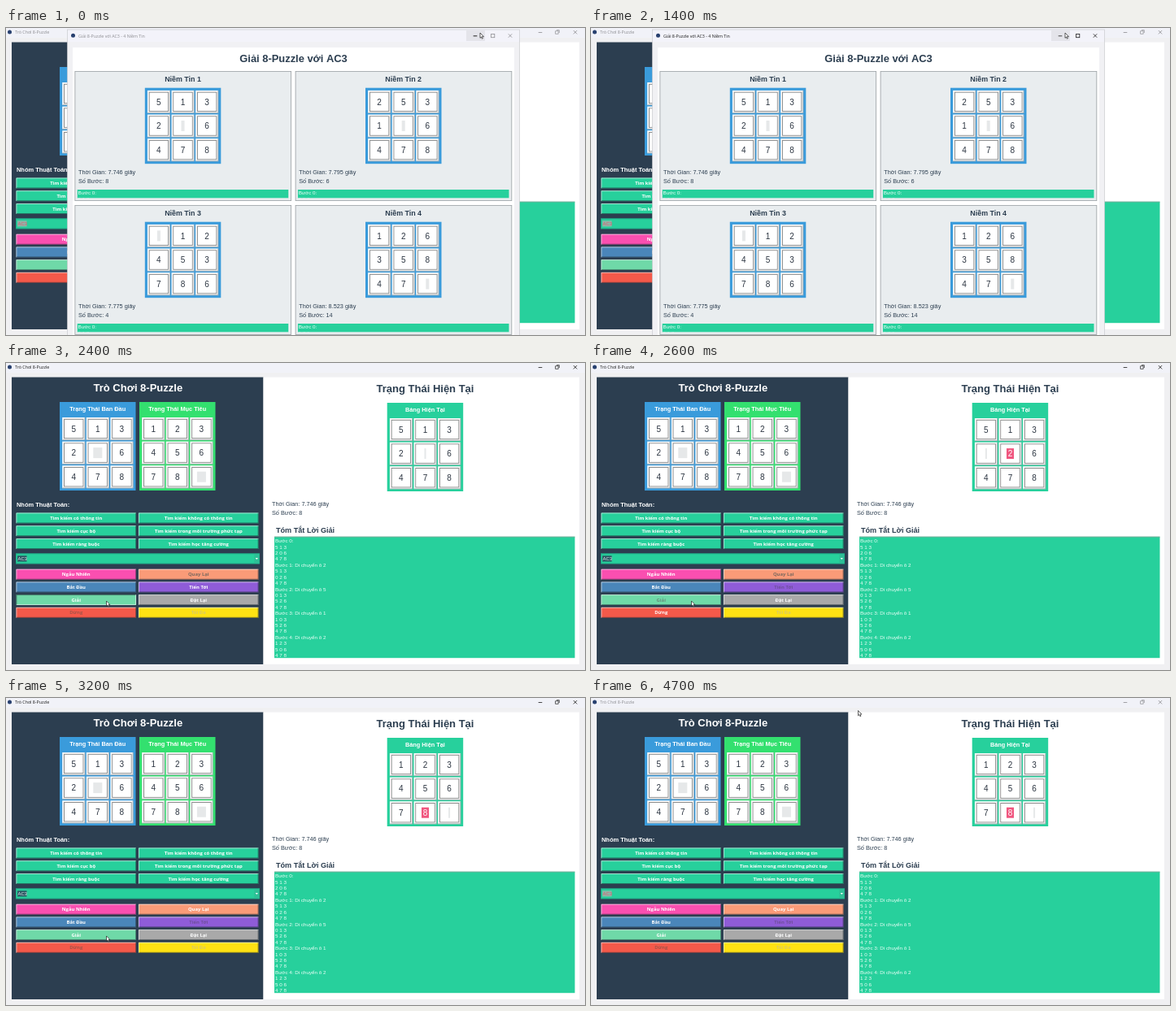
An HTML page with a canvas that plays this animation: 712 by 378 pixels, repeating every 4.8 s.

```html
<!DOCTYPE html>
<html lang="vi">
<head>
<meta charset="utf-8">
<title>8-Puzzle</title>
<style>
html, body { margin: 0; width: 100%; height: 100%; overflow: hidden; background: #f0f0f0; }
canvas { display: block; width: 712px; height: 378px; }
</style>
</head>
<body>
<canvas id="stage" width="712" height="378"></canvas>
<script>
const ctx = document.getElementById('stage').getContext('2d');
const LOOP = 4800, STEP = 100;
const ARIAL = '"Liberation Sans", sans-serif';
const UI = '"Open Sans", sans-serif';
const NAVY = '#2c3e50', TEAL = '#27d09c', BLUE = '#3a9bdb', LIME = '#33e06f';

const START = [5, 1, 3, 2, 0, 6, 4, 7, 8];
const GOAL = [1, 2, 3, 4, 5, 6, 7, 8, 0];
const MOVES = [2, 5, 1, 2, 5, 4, 7, 8];
const BELIEFS = [
  { tiles: START, time: '7.746', steps: 8 },
  { tiles: [2, 5, 3, 1, 0, 6, 4, 7, 8], time: '7.795', steps: 6 },
  { tiles: [0, 1, 2, 4, 5, 3, 7, 8, 6], time: '7.775', steps: 4 },
  { tiles: [1, 2, 6, 3, 5, 8, 4, 7, 0], time: '8.523', steps: 14 }
];

// Pointer tip: time, x, y
const POINTER = [
  [0, 583, 6], [1800, 580, 7], [1900, 540, 40], [2000, 430, 128], [2100, 280, 222],
  [2200, 165, 276], [2300, 123.5, 293], [3600, 130.5, 285.5], [3800, 152, 259],
  [3900, 205, 190], [4000, 266, 112], [4100, 308, 60.5], [4200, 318, 40],
  [4300, 323.5, 26.5], [4400, 328.5, 15.5]
];

// Every board along the solution
const path = [START];
for (const tile of MOVES) {
  const next = path[path.length - 1].slice();
  const from = next.indexOf(tile), to = next.indexOf(0);
  next[to] = tile;
  next[from] = 0;
  path.push(next);
}

function rect(x, y, w, h, fill) {
  ctx.fillStyle = fill;
  ctx.fillRect(x, y, w, h);
}

function frame(x, y, w, h, stroke, width = 1) {
  ctx.strokeStyle = stroke;
  ctx.lineWidth = width;
  ctx.strokeRect(x, y, w, h);
}

function line(color, width, ...pts) {
  ctx.strokeStyle = color;
  ctx.lineWidth = width;
  ctx.beginPath();
  for (let i = 0; i < pts.length; i += 2) ctx.lineTo(pts[i], pts[i + 1]);
  ctx.stroke();
}

// y is the middle of the capital letters
function text(str, x, y, size, color, { bold = false, align = 'left', face = ARIAL } = {}) {
  ctx.font = `${bold ? 'bold ' : ''}${size}px ${face}`;
  ctx.textAlign = align;
  ctx.textBaseline = 'alphabetic';
  ctx.fillStyle = color;
  ctx.fillText(str, x, y + size * 0.36);
}

const heading = (str, x, y, size, color) => text(str, x, y, size, color, { bold: true, align: 'center' });

function board(x, y, tiles, blankWidth, marked) {
  tiles.forEach((n, i) => {
    const cx = x + (i % 3) * 29.6, cy = y + Math.floor(i / 3) * 29.6;
    rect(cx - 14, cy - 14, 28, 28, '#fafafa');
    line('#8d9499', 0.7, cx - 13.7, cy + 13.7, cx + 13.7, cy + 13.7, cx + 13.7, cy - 13.7);
    frame(cx - 11.7, cy - 11.7, 23.4, 23.4, '#8c8c8c', 1);
    rect(cx - 11, cy - 11, 22, 22, '#fff');
    if (!n) {
      rect(cx - blankWidth / 2, cy - 6.5, blankWidth, 13, '#e6e8e9');
      return;
    }
    const hot = n === marked;
    if (hot) rect(cx - 4.5, cy - 6.5, 9, 13, '#f0567f');
    text(n, cx, cy, 10, hot ? '#fff' : '#2b3440', { align: 'center' });
  });
}

function titledBoard(x, y, color, title, tiles, blankWidth, marked) {
  rect(x, y, 93.5, 109, color);
  heading(title, x + 46.7, y + 8, 7.35, '#fff');
  board(x + 17.2, y + 33, tiles, blankWidth, marked);
}

function button(x, y, color, label, ink = '#fff', sunken = false) {
  const w = 147.5, h = 12.8;
  rect(x, y, w, h, color);
  const light = 'rgba(255,255,255,.7)', dark = 'rgba(30,40,50,.6)';
  line(sunken ? dark : light, 0.8, x + 0.4, y + h, x + 0.4, y + 0.4, x + w, y + 0.4);
  line(sunken ? light : dark, 0.8, x + 0.4, y + h - 0.4, x + w - 0.4, y + h - 0.4, x + w - 0.4, y);
  text(label, x + w / 2, y + 6.4, 5.9, ink, { bold: true, align: 'center', face: UI });
}

function windowBar(x, y, title, active, controls, restored) {
  const ink = active ? '#1c1c1c' : '#8d8d92';
  ctx.fillStyle = '#28406f';
  ctx.beginPath();
  ctx.arc(x, y, 2.5, 0, 7);
  ctx.fill();
  text(title, x + 6.5, y + 0.3, 5.3, ink, { face: UI });
  const [a, b, c] = controls;
  line(ink, 0.8, a - 2.3, y + 0.5, a + 2.3, y + 0.5);
  if (restored) {
    frame(b - 2.3, y - 1.2, 3.4, 3.4, ink, 0.7);
    line(ink, 0.7, b - 1, y - 2.4, b + 2.3, y - 2.4, b + 2.3, y + 1);
  } else {
    frame(b - 2.1, y - 1.8, 4.2, 4.2, ink, 0.8);
  }
  line(ink, 0.8, c - 2.2, y - 2, c + 2.2, y + 2.4);
  line(ink, 0.8, c - 2.2, y + 2.4, c + 2.2, y - 2);
}

function combo(focused) {
  rect(12, 234.5, 300, 12.8, TEAL);
  frame(12.4, 234.9, 299.2, 12, '#1e9f80', 0.7);
  rect(14, 237.3, 11.5, 7.2, focused ? '#2b5863' : '#8fb5a8');
  text('AC3', 14.5, 241, 5.9, focused ? '#e6efef' : '#e2596c');
  rect(305.3, 235.4, 6, 11, '#2ebf96');
  ctx.fillStyle = '#fff';
  ctx.beginPath();
  ctx.moveTo(306.7, 240);
  ctx.lineTo(309.9, 240);
  ctx.lineTo(308.3, 242);
  ctx.fill();
}

function controls(t) {
  const busy = t >= 2500 && t < 3200, done = t >= 3200;
  const ink = (on, off) => on ? '#fff' : off;
  const searches = ['Tìm kiếm có thông tin', 'Tìm kiếm không có thông tin', 'Tìm kiếm cục bộ',
    'Tìm kiếm trong môi trường phức tạp', 'Tìm kiếm ràng buộc', 'Tìm kiếm học tăng cường'];
  searches.forEach((s, i) => button(i % 2 ? 163 : 12.5, 184.5 + (i >> 1) * 15.8, TEAL, s));
  const actions = [
    ['#fa4fb0', 'Ngẫu Nhiên'],
    ['#fa9b78', 'Quay Lại', ink(done, '#79695f')],
    ['#4a86ba', 'Bắt Đầu'],
    ['#8f5cd8', 'Tiến Tới', ink(t < 2500, '#6f4f9b')],
    ['#6fd9a8', 'Giải', ink(!busy, '#688c7b'), t === 2400],
    ['#a9a9a9', 'Đặt Lại'],
    ['#f4594a', 'Dừng', ink(busy, '#a35449')],
    ['#ffe213', 'Tối Đa', '#d9ca68']
  ];
  actions.forEach(([color, label, tint, sunken], i) =>
    button(i % 2 ? 163 : 12.5, 253.8 + (i >> 1) * 15.7, color, label, tint, sunken));
}

function solutionLog() {
  rect(330, 213.8, 369.5, 149.4, TEAL);
  line('#8aa59b', 0.8, 330, 214.1, 699.5, 214.1);
  ctx.save();
  ctx.beginPath();
  ctx.rect(330, 213.8, 369.5, 149.4);
  ctx.clip();
  for (let i = 0; i < 5; i++) {
    const rows = [`Bước ${i}:` + (i ? ` Di chuyển ô ${MOVES[i - 1]}` : '')];
    for (let r = 0; r < 9; r += 3) rows.push(path[i].slice(r, r + 3).join(' '));
    rows.forEach((s, r) => text(s, 331, 219 + (i * 4 + r) * 7.41, 6.25, '#effff9'));
  }
  ctx.restore();
}

function mainWindow(t) {
  const active = t >= 1800 && t < 4700;
  rect(0, 0, 712, 378, '#f0f0f2');
  rect(0, 0, 712, 12, '#f1f2f8');
  windowBar(4.5, 5, 'Trò Chơi 8-Puzzle', active, [657, 678, 700], true);

  rect(7, 17.5, 309.5, 353.5, NAVY);
  rect(316.5, 17.5, 388.5, 353.5, '#fff');
  heading('Trò Chơi 8-Puzzle', 162.3, 30.5, 13, '#fff');
  titledBoard(66, 48, BLUE, 'Trạng Thái Ban Đầu', START, 11);
  titledBoard(164, 48, LIME, 'Trạng Thái Mục Tiêu', GOAL, 11);
  text('Nhóm Thuật Toán:', 13, 174.3, 7.45, '#fff', { bold: true });
  controls(t);
  combo(active);

  // Eight moves spread over 600 ms
  const n = t < 2600 ? 0 : Math.min(8, Math.round(1 + (t - 2600) * 7 / 600));
  heading('Trạng Thái Hiện Tại', 515.5, 31, 13, NAVY);
  titledBoard(468.7, 49, TEAL, 'Bảng Hiện Tại', path[n], 2, MOVES[n - 1]);
  text('Thời Gian: 7.746 giây', 327, 173, 7.3, NAVY);
  text('Số Bước: 8', 327, 184, 7.3, NAVY);
  text('Tóm Tắt Lời Giải', 332, 205.5, 9.1, NAVY, { bold: true });
  solutionLog();
}

function belief(b, i) {
  const x = 84.5 + (i % 2) * 271.2, y = 53 + (i >> 1) * 165;
  rect(x, y, 266.5, 160, '#e9edef');
  frame(x + 0.4, y + 0.4, 265.7, 159.2, '#9da2a5', 0.8);
  heading(`Niềm Tin ${i + 1}`, x + 133, y + 9.5, 8.9, NAVY);
  rect(x + 86.3, y + 20.7, 93.5, 93.5, BLUE);
  board(x + 103.4, y + 37.9, b.tiles, 4);
  text(`Thời Gian: ${b.time} giây`, x + 4.5, y + 124.5, 7.3, NAVY);
  text(`Số Bước: ${b.steps}`, x + 4.5, y + 135.7, 7.3, NAVY);
  ctx.save();
  ctx.beginPath();
  ctx.rect(x + 3, y + 146, 260, 10.6);
  ctx.clip();
  rect(x + 3, y + 146, 260, 10.6, TEAL);
  text('Bước 0:', x + 4, y + 150, 6.25, '#effff9');
  text(b.tiles.slice(0, 3).join(' '), x + 4, y + 157.4, 6.25, '#effff9');
  ctx.restore();
}

function popup(active) {
  rect(75.5, 2, 556, 376, '#f1f1f4');
  rect(75.5, 2, 556, 15, '#f3f3fa');
  frame(75.5, 2, 556, 380, '#c9cacf', 0.7);
  rect(566, 3, 23, 13, '#e4e4ea');
  windowBar(82.5, 9.3, 'Giải 8-Puzzle với AC3 - 4 Niềm Tin', active, [577, 598.7, 620], false);
  if (!active) line('#1c1c1c', 0.8, 574.7, 9.8, 579.3, 9.8);
  rect(82, 24, 543, 354, '#fff');
  heading('Giải 8-Puzzle với AC3', 353.5, 37, 12.9, NAVY);
  BELIEFS.forEach(belief);
}

function pointer(t) {
  const [, x, y] = POINTER.filter(p => p[0] <= t).pop();
  ctx.beginPath();
  for (const [dx, dy] of [[0, 0], [0, 6.3], [1.4, 5], [2.4, 7.2], [3.4, 6.7], [2.5, 4.6], [4.4, 4.5]])
    ctx.lineTo(x + dx, y + dy);
  ctx.closePath();
  ctx.fillStyle = '#fff';
  ctx.fill();
  ctx.strokeStyle = '#222';
  ctx.lineWidth = 0.7;
  ctx.stroke();
}

const begin = performance.now();

function draw(now) {
  const t = Math.floor(Math.max(0, now - begin) % LOOP / STEP) * STEP;
  mainWindow(t);
  if (t < 1800) popup(t >= 1400);
  pointer(t);
  requestAnimationFrame(draw);
}
draw(begin);
</script>
</body>
</html>
```
